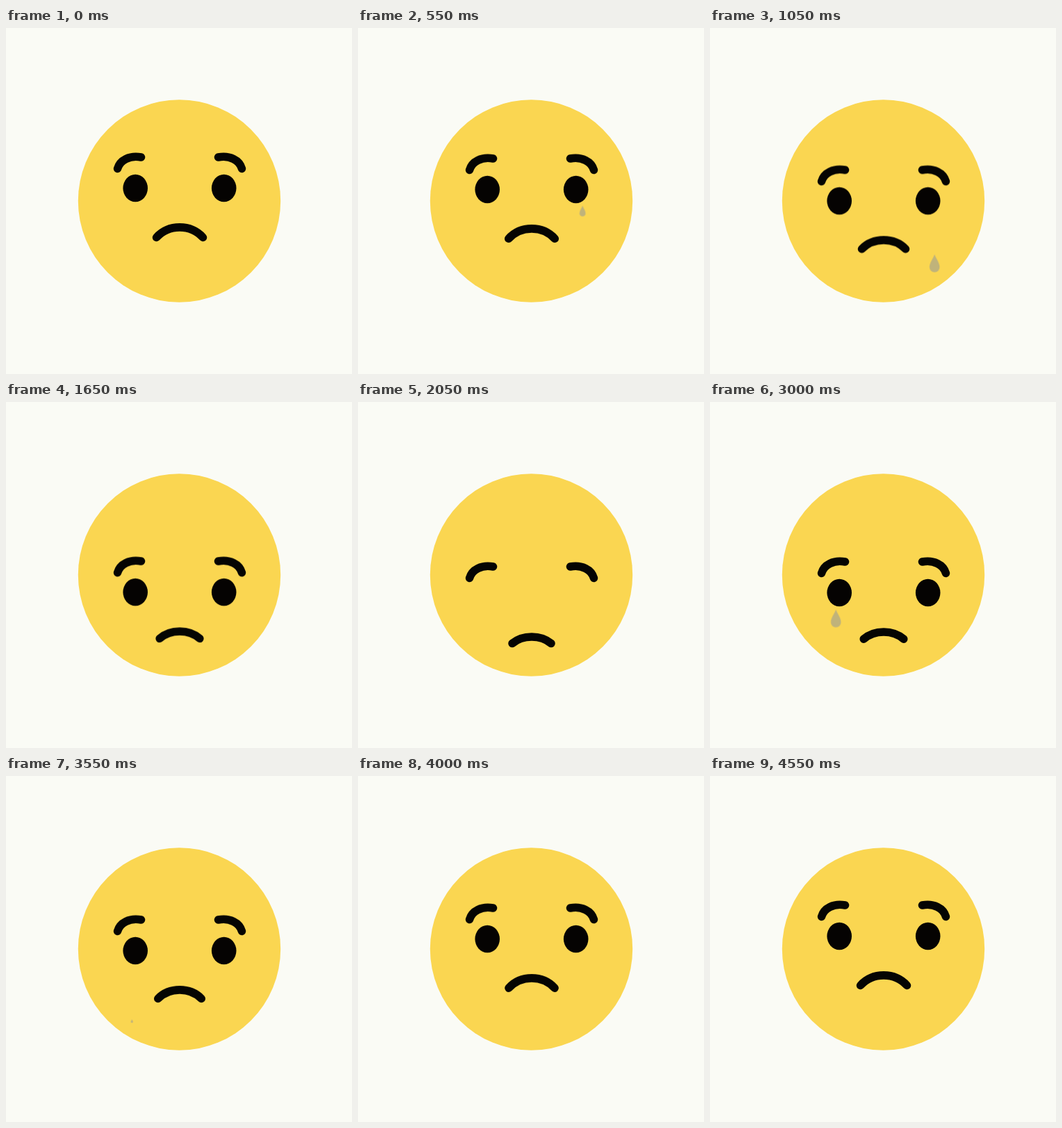
Recreate the animation shown at these times as an HTML page. Size 498 by 498 pixels, loop 4600 ms.

```html
<!DOCTYPE html>
<html lang="en">
<head>
<meta charset="utf-8">
<title>Sad face</title>
<style>
  html, body { margin: 0; width: 100%; height: 100%; overflow: hidden; background: #fafbf5; }
  svg { display: block; width: 498px; height: 498px; }

  .features, .mouth, .eye, .drop, .tear { animation: 4600ms infinite; }
  .features, .mouth, .drop { animation-timing-function: cubic-bezier(.333, 0, .667, 1); }
  .eye, .tear { animation-timing-function: linear; }

  .line { fill: none; stroke: #050503; stroke-width: 11.6; stroke-linecap: round; }
  .features { animation-name: sink; }
  .mouth { animation-name: frown; }
  .eye { fill: #050302; transform-box: fill-box; transform-origin: center; animation-name: blink; }
  .drop { animation-name: fall; }
  .tear { fill: #c0b37a; transform-origin: 0 0; animation-name: swell; }
  .right { --from: 258px; --to: 354px; }
  .left { --from: 300px; --to: 353px; }
  /* the left tear runs 2320 ms after the right one */
  .left, .left .tear { animation-delay: -2280ms; }

  @keyframes sink {
    0%, 7.6% { transform: translateY(0); }
    45.2%, 56.7% { transform: translateY(51px); }
    93.3%, 100% { transform: translateY(0); }
  }
  @keyframes frown {
    0%, 7.6% { d: path("M-33.5 14.5C-16 -5 16 -5 33.5 14.5"); }
    45.2%, 56.7% { d: path("M-28 9.5C-13 -3.2 13 -3.2 28 9.5"); }
    93.3%, 100% { d: path("M-33.5 14.5C-16 -5 16 -5 33.5 14.5"); }
  }
  @keyframes blink {
    0%, 40.2% { transform: scaleY(1); }
    43.4%, 46.8% { transform: scaleY(0); }
    50%, 100% { transform: scaleY(1); }
  }
  @keyframes fall {
    0%, 9.35% { transform: translateY(var(--from)); }
    27.4%, 100% { transform: translateY(var(--to)); }
  }
  @keyframes swell {
    0%, 9.35% { transform: scale(0); }
    13.7%, 23.5% { transform: scale(1); }
    27.6%, 100% { transform: scale(0); }
  }
</style>
</head>
<body>
<svg viewBox="0 0 498 498">
  <defs>
    <path id="brow" d="M160.5 202.5C164 190 178 183 194.5 186"/>
    <path id="tear" d="M0 -13C2 -7 7.3 -1 7.3 5.5A7.3 7.3 0 0 1 -7.3 5.5C-7.3 -1 -2 -7 0 -13Z"/>
  </defs>
  <circle cx="249.5" cy="249" r="145.7" fill="#fad651"/>
  <g class="features">
    <g class="line">
      <use href="#brow"/>
      <use href="#brow" transform="translate(500) scale(-1 1)"/>
      <g transform="translate(250 287)">
        <path class="mouth" d="M-33.5 14.5C-16 -5 16 -5 33.5 14.5"/>
      </g>
    </g>
    <ellipse class="eye" cx="186.2" cy="230.5" rx="17.8" ry="19.7"/>
    <ellipse class="eye" cx="313.7" cy="230.5" rx="17.8" ry="19.7"/>
  </g>
  <g transform="translate(323.2)">
    <g class="drop right"><use class="tear" href="#tear"/></g>
  </g>
  <g transform="translate(181.2)">
    <g class="drop left"><use class="tear" href="#tear"/></g>
  </g>
</svg>
</body>
</html>
```
